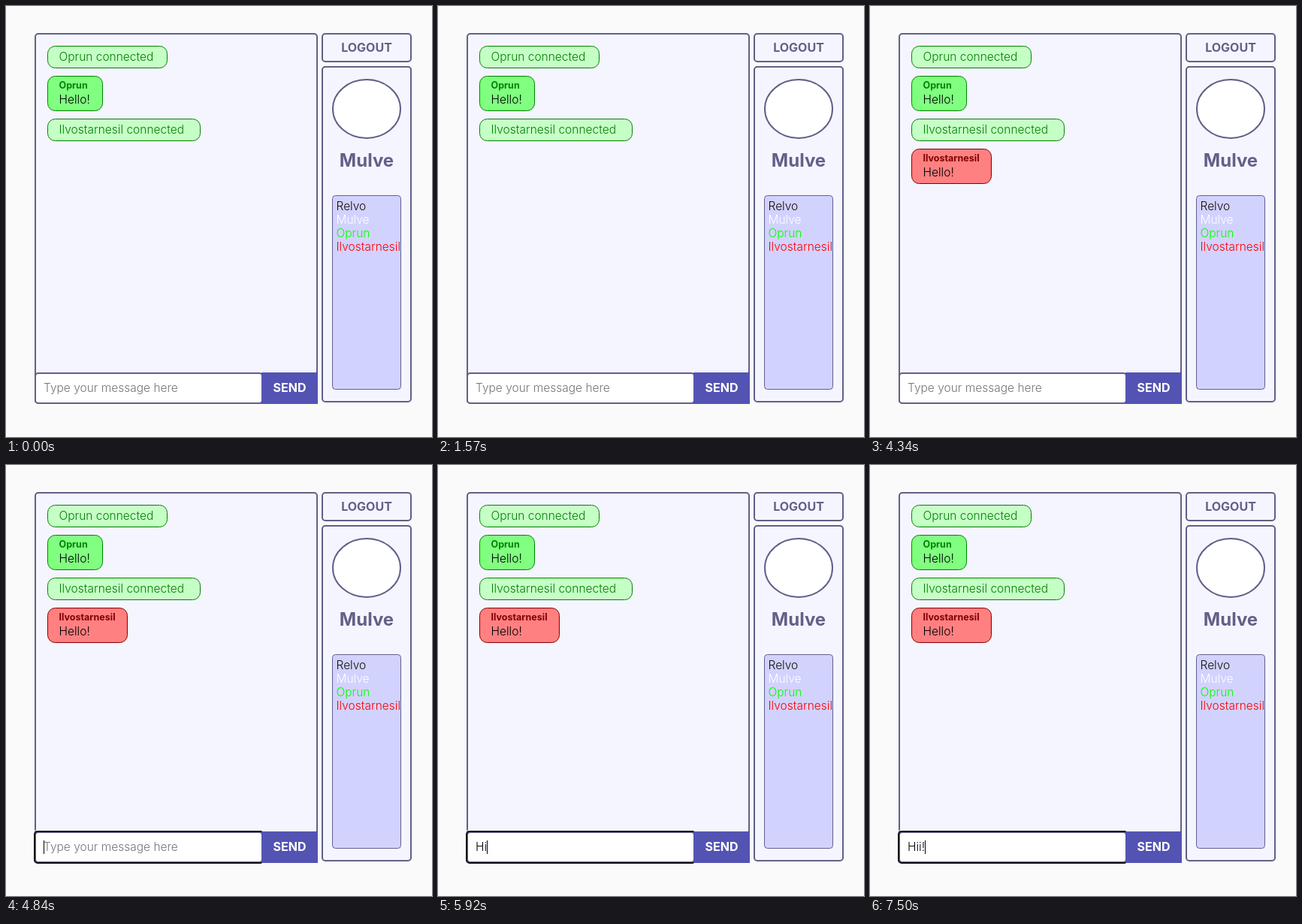
Animation, 567 px wide and 574 px high, one loop 8000 ms. Source, as an HTML page:

```html
<!DOCTYPE html>
<html lang="en">
<head>
<meta charset="utf-8">
<title>Chat</title>
<style>
  html, body { margin: 0; width: 100%; height: 100%; overflow: hidden; background: #fafafa; }
  svg { display: block; width: 567px; height: 574px; }
  text { font: 300 15.5px Inter, "Open Sans", sans-serif; }
  .panel { fill: #f5f5ff; stroke: #606088; stroke-width: 2; }
  .paper { fill: #fff; stroke: #606088; stroke-width: 2; }
  .bold { font-size: 16px; font-weight: 700; text-anchor: middle; fill: #606088; }
  .title { font-size: 24px; }
  .name { font-size: 12.5px; font-weight: 700; }
  .lime { stroke: #008000; fill: #80ff80; }
  .pale { stroke: #008000; fill: #c6ffc6; }
  .rose { stroke: #800000; fill: #ff8080; }
  .leaf { fill: #008000; }
  .wine { fill: #800000; }
</style>
</head>
<body>
<svg viewBox="0 0 567 574">
  <clipPath id="listClip"><rect x="435" y="253" width="90" height="257"/></clipPath>

  <rect class="panel" x="39" y="37" width="375" height="492" rx="4"/>
  <rect class="panel" x="421" y="37" width="118" height="37" rx="4"/>
  <rect class="panel" x="421" y="81" width="118" height="446" rx="4"/>

  <rect class="pale" x="55.5" y="53.5" width="159" height="29" rx="10"/>
  <text class="leaf" x="70.5" y="73">Oprun connected</text>
  <rect class="lime" x="55.5" y="93.5" width="73" height="46" rx="10"/>
  <text class="leaf name" x="70.5" y="110">Oprun</text>
  <text x="70.5" y="130">Hello!</text>
  <rect class="pale" x="55.5" y="150.5" width="203" height="29" rx="10"/>
  <text class="leaf" x="70.5" y="170">Ilvostarnesil connected</text>
  <g id="reply">
    <rect class="rose" x="55.5" y="190.5" width="106" height="46" rx="10"/>
    <text class="wine name" x="70.5" y="207">Ilvostarnesil</text>
    <text x="70.5" y="227">Hello!</text>
  </g>

  <rect class="paper" x="39" y="489" width="302" height="40" rx="4"/>
  <g id="focus" fill="none">
    <rect x="36.5" y="486.5" width="307" height="44" rx="4" stroke="#fff"/>
    <rect x="38" y="488" width="304.5" height="42" rx="4" stroke="#101014" stroke-width="2"/>
  </g>
  <text id="field" x="50" y="514"></text>
  <rect id="caret" y="500" width="1" height="18"/>
  <rect x="340" y="488" width="75" height="42" fill="#5353b3"/>
  <text class="bold" x="377.5" y="514" style="fill:#fff">SEND</text>

  <text class="bold" x="480" y="61">LOGOUT</text>
  <ellipse class="paper" cx="480" cy="137" rx="45" ry="39"/>
  <text class="bold title" x="480" y="214">Mulve</text>
  <rect x="434.5" y="252.5" width="91" height="258" rx="4" fill="#d2d2ff" stroke="#606088"/>
  <g clip-path="url(#listClip)">
    <text x="439.5" y="272" fill="#111">Relvo</text>
    <text x="439.5" y="290" fill="#fff">Mulve</text>
    <text x="439.5" y="308" fill="#0f0">Oprun</text>
    <text x="439.5" y="326" fill="#f00">Ilvostarnesil</text>
  </g>
</svg>
<script>
  const LOOP = 8000, REPLY = 4340, FOCUS = 4840;
  // [time, typed text, caret visible]
  const steps = [
    [0, "", false], [FOCUS, "", true], [5350, "", false],
    [5520, "H", true], [5920, "Hi", true], [6400, "Hi", false],
    [7020, "Hii", true], [7500, "Hii!", true]
  ];
  const $ = id => document.getElementById(id);
  const reply = $("reply"), focus = $("focus"), field = $("field"), caret = $("caret");
  const show = (el, on) => el.setAttribute("visibility", on ? "visible" : "hidden");

  function draw(now) {
    const t = now % LOOP;
    const [, typed, blink] = steps.filter(s => s[0] <= t).pop();
    show(reply, t >= REPLY);
    show(focus, t >= FOCUS);
    show(caret, blink);
    field.textContent = typed || "Type your message here";
    field.setAttribute("fill", typed ? "#000" : "#757575");
    const width = typed ? field.getComputedTextLength() : 0;
    caret.setAttribute("x", Math.round(50 + width));
    requestAnimationFrame(draw);
  }
  draw(performance.now());
</script>
</body>
</html>
```
